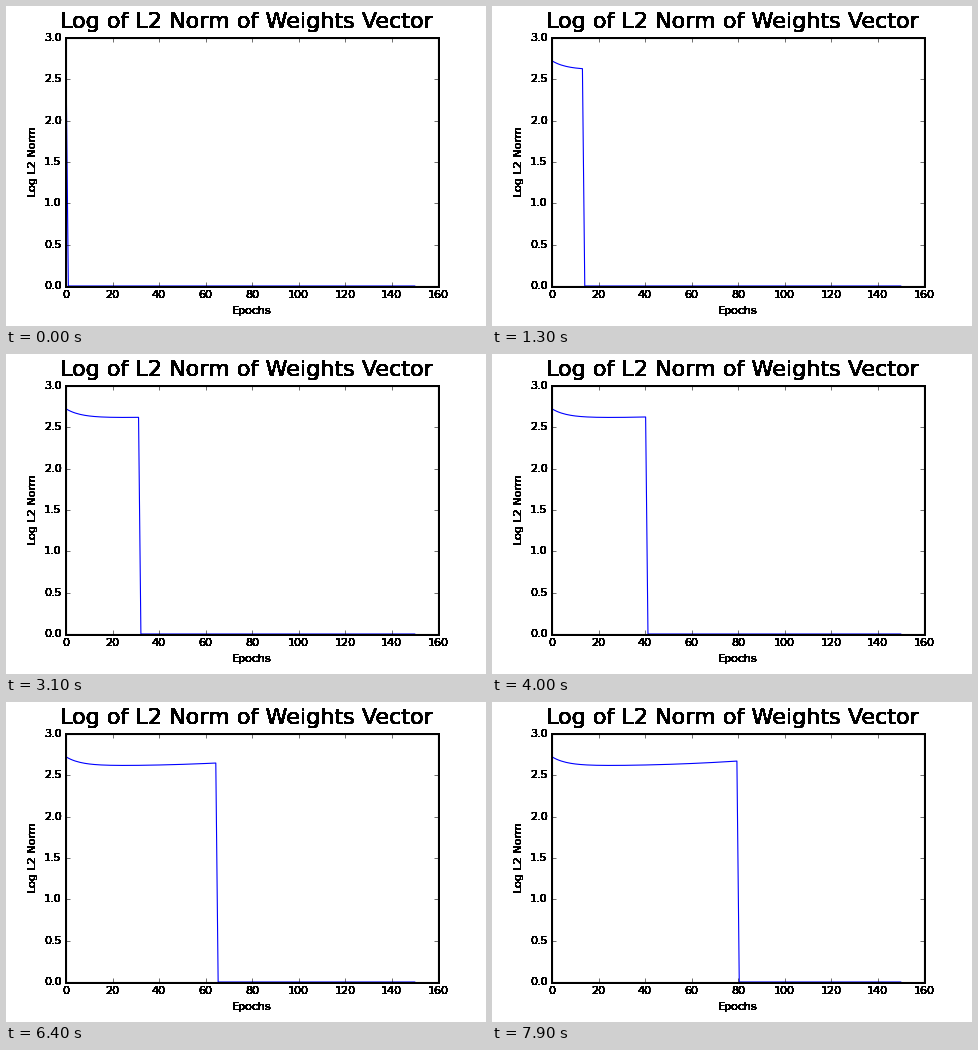
Animation, 480 px wide and 320 px high, one loop 8000 ms. Source, as a matplotlib script:

```python
import numpy as np
import matplotlib.pyplot as plt
from matplotlib.animation import FuncAnimation
from matplotlib.patches import Rectangle

W, H, DPI = 480, 320, 80
FRAMES, STEP_MS = 80, 100
POINTS = 150

plt.style.use("classic")
plt.rcParams.update({
    "font.family": "DejaVu Sans",
    "font.size": 10,
    "figure.facecolor": "white",
    "savefig.dpi": "figure",
})


def harden(img, dpi):
    """Turn soft text edges nearly solid black, as if overprinted many times."""
    out = np.zeros_like(img)
    out[..., 3] = 1 - (1 - img[..., 3]) ** 30
    return out, 0, 0


def log_norm(k):
    """Fast initial decay followed by slow growth."""
    return 2.6145 + 0.1095 * np.exp(-k / 6.3) + 0.058 * (k / 79) ** 2.5


fig = plt.figure(figsize=(W / DPI, H / DPI), dpi=DPI)
ax = fig.add_axes([0.125, 0.125, 0.775, 0.775])
ax.set_xlim(0, 160)
ax.set_ylim(0, 3)
ax.set_xticks(np.arange(0, 161, 20))
ax.set_yticks(np.arange(0, 3.1, 0.5))

# Black backing that thickens the frame by one pixel on the outside
fig.add_artist(Rectangle((59 / W, 38 / H), 375 / W, 251 / H,
                         transform=fig.transFigure, facecolor="black",
                         edgecolor="none", linewidth=0, zorder=-1))

texts = [
    fig.suptitle("Log of L2 Norm of Weights Vector", fontsize=20),
    ax.set_xlabel("Epochs"),
    ax.set_ylabel("Log L2 Norm"),
    *ax.get_xticklabels(),
    *ax.get_yticklabels(),
]
for text in texts:
    text.set_agg_filter(harden)

index = np.arange(POINTS)
epochs = np.linspace(0, 150, POINTS)
norms = log_norm(index)
line, = ax.plot(epochs, np.zeros(POINTS), color="b", linewidth=1)
ax.set_xlim(0, 160)
ax.set_ylim(0, 3)


def update(k):
    line.set_ydata(np.where(index <= k, norms, 0))
    return line,


anim = FuncAnimation(fig, update, frames=FRAMES, interval=STEP_MS,
                     repeat=True, repeat_delay=0, blit=False)
plt.show()
```
